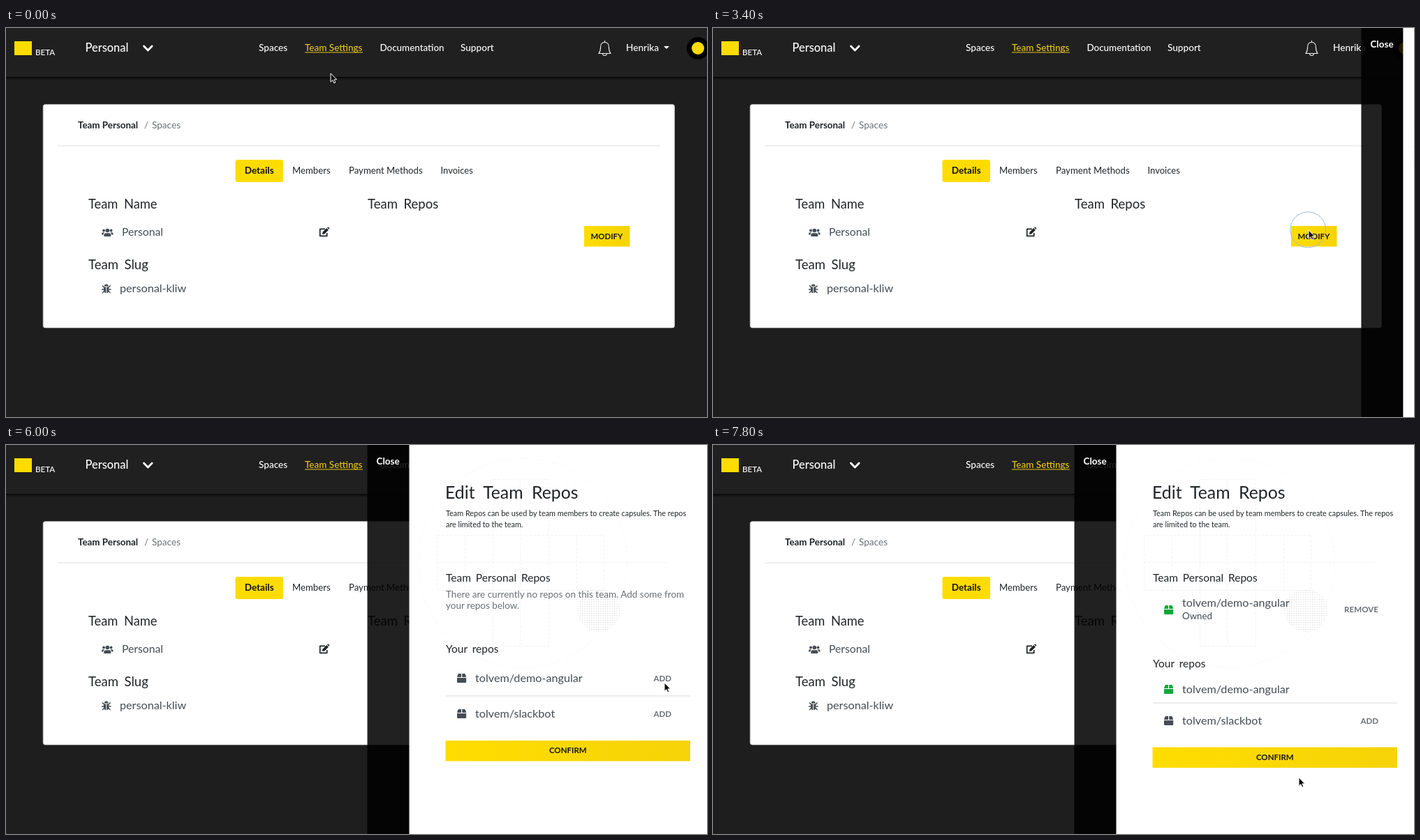
An HTML page for the animation above (8 s loop, 1004x558 px).

```html
<!DOCTYPE html>
<html lang="en">
<head>
<meta charset="utf-8">
<title>Team settings</title>
<style>
  html, body { margin: 0; width: 100%; height: 100%; overflow: hidden; background: #1e1e1e; }
  svg { display: block; width: 100vw; height: 100vh; }
  text { font-family: Lato, "Open Sans", sans-serif; white-space: pre; }
</style>
</head>
<body>
<svg id="stage" viewBox="0 0 1004 558"></svg>
<script>
const LOOP = 8000, STEP = 200;
const INK = '#212427', GREY = '#6b7075', SLATE = '#454c53', YELLOW = '#ffdc00', GREEN = '#16a637';

const text = (x, y, s, size, fill = INK, weight = 400, extra = '') =>
  `<text x="${x}" y="${y}" font-size="${size}" fill="${fill}" font-weight="${weight}" ${extra}>${s}</text>`;
const mid = 'text-anchor="middle"', end = 'text-anchor="end"';
const rect = (x, y, w, h, fill, extra = '') =>
  `<rect x="${x}" y="${y}" width="${w}" height="${h}" fill="${fill}" ${extra}/>`;
const line = (d, stroke, w = 1, extra = '') =>
  `<path d="${d}" fill="none" stroke="${stroke}" stroke-width="${w}" ${extra}/>`;
const group = (id, body, extra = '') => `<g id="${id}" ${extra}>${body}</g>`;
const heading = (x, y, s, size, gap) => text(x, y, s, size, INK, 400, `word-spacing="${gap}"`);

const nav = () =>
  rect(0, 0, 1004, 71, '#202020') + rect(0, 70, 1004, 2.5, '#0c0c0c') +
  rect(0, 72.5, 1004, 2, '#181818') +
  rect(12, 19, 25, 20, YELLOW) +
  text(42, 39, 'BETA', 11.6, '#fff', 500) +
  text(113.5, 34, 'Personal', 16.4, '#fff', 500) +
  line('M197.5 26l5.8 6 5.8-6', '#fff', 2.8, 'stroke-linecap="round" stroke-linejoin="round"') +
  text(362, 33, 'Spaces', 13.6, '#fff', 500) +
  text(428, 33, 'Team Settings', 13.5, '#e8c81c', 500) +
  rect(428, 34.5, 83, 1, '#e8c81c') +
  text(535.5, 33, 'Documentation', 13.4, '#fff', 500) +
  text(651, 33, 'Support', 13.6, '#fff', 500) +
  line('M849 36.5c2-2.5 2.6-4.5 2.6-9 0-4.500 2-7 5.900-7s5.900 2.500 5.900 7c0 4.500.6 6.500 2.600 9zM857.500 18v2.500M854.500 37c.4 3.300 5.600 3.300 6 0', '#f2f2f2', 1.1) +
  text(888, 33, 'Henrika', 13.6, '#fff', 500) +
  '<path d="M942 26h8l-4 4z" fill="#fff"/>' +
  `<circle cx="991" cy="29" r="12.5" fill="${YELLOW}" stroke="#000" stroke-width="7"/>`;

const users = 
  [[140, 290.5, 1.9], [150.500, 290.500, 1.9], [145.300, 290.500, 2.800]]
    .map(([x, y, r]) => `<circle cx="${x}" cy="${y}" r="${r}"/>`).join('') +
  '<path d="M140.300 299v-2q0-2.700 2.700-2.700h4.600q2.700 0 2.700 2.700v2zM137 296.500v-1.500q0-1.800 1.800-1.800h2.200q-1.600 1.200-1.700 3.300zM153.500 296.500v-1.500q0-1.800-1.800-1.800h-2.200q1.600 1.200 1.700 3.300z"/>';

const bug =
  '<path d="M140.700 370.500a3 3 0 0 1 6 0zM140 371.500h3.200v8.800q-3.200-.6-3.200-4zM144.200 371.500h3.200v4.800q0 3.400-3.200 4z"/>' +
  line('M138 369.500l2.500 2.500M149.500 369.500l-2.500 2.500M137 375h3M150.500 375h-3M138 380l2.500-2.500M149.500 380l-2.500-2.500', SLATE, 1.5);

const edit =
  line('M457 288.300h-7.300v10h10v-4.300', INK, 1.7, 'stroke-linejoin="round"') +
  `<path d="M453 296l.5-3.200 5.700-5.700 2.700 2.700-5.700 5.700zM460 286.300l.8-.7q.6-.4 1.200.1l1 1q.5.600 0 1.200l-.7.800z" fill="${INK}"/>`;

const card = () =>
  rect(53.2, 109.7, 904.3, 320.3, '#fff', 'rx="3" stroke="#cfcfcf" stroke-width=".7"') +
  text(103, 143.500, 'Team Personal', 13.4, INK, 700) +
  text(198, 143.500, '/', 13.4, GREY) + text(209, 143.500, 'Spaces', 13.6, GREY) +
  rect(74, 168.500, 863, 1, '#dedede') +
  rect(328.500, 189, 68.500, 32, YELLOW, 'rx="3"') +
  text(362.700, 209, 'Details', 13.5, '#111', 700, mid) +
  text(410, 209, 'Members', 13.2) +
  text(491, 209, 'Payment Methods', 13.2) +
  text(622.500, 209, 'Invoices', 13) +
  heading(118, 258.500, 'Team Name', 18.3, 4) +
  heading(518, 258.500, 'Team Repos', 18.5, 4) +
  heading(118, 345.500, 'Team Slug', 18.5, 4) +
  `<g fill="${SLATE}">${users}${bug}</g>` + edit +
  text(166, 298, 'Personal', 15.7, SLATE) +
  text(163, 379, 'personal-kliw', 16.2, SLATE) +
  rect(828, 284, 65.500, 29.500, 'url(#gold)') +
  text(860.500, 302.500, 'MODIFY', 11.4, '#161616', 700, mid);

const backdrop = () =>
  `<g opacity=".75">` +
  line('M617.500 129.500h239v79h-239zM697.500 49.500h80v239h-80zM736.500 49v239M617 168.500h328M657.500 129v79M817.500 129v79', '#f0f0f0', 1, 'stroke-dasharray="4 2"') +
  '<circle cx="740" cy="169" r="150" fill="none" stroke="#f3f3f3" stroke-dasharray="3 3"/>' +
  '<circle cx="849" cy="237" r="31" fill="url(#dots)"/></g>';

const crate = (y, fill) =>
  `<path transform="translate(646 ${y - 6.5})" fill="${fill}" d="M2.500 0h3.500v5h-6l1.300-4q.4-1 1.200-1zM7.200 0h3.500q.8 0 1.200 1l1.300 4h-6zM0 6h13.200v5.800q0 1.200-1.200 1.200h-10.800q-1.200 0-1.200-1.200z"/>`;
const repo = (y, name, action, fill = SLATE) =>
  crate(y + .5, fill) + text(672, y + 5.500, 'tolvem/' + name, 16.2, SLATE) +
  (action ? text(953, y + 4.500, action, 11.5, GREY, 700, end) : '');
const confirm = y =>
  rect(629.500, y, 350.500, 29.500, 'url(#gold)') +
  text(804.800, y + 18.300, 'CONFIRM', 11.5, '#161616', 700, mid);
const teamHead = heading(630, 195.500, 'Team Personal Repos', 15.5, 3);
const noTeamRepos = teamHead +
  text(630, 218.500, 'There are currently no repos on this team. Add some from', 13.5, GREY) +
  text(630, 234.500, 'your repos below.', 13.5, GREY);
const yours = y => heading(630, y, 'Your repos', 15.5, 3);

const panel = () =>
  rect(517.500, 0, 60.500, 558, '#000', 'opacity=".87"') +
  text(530.500, 27.500, 'Close', 13.5, '#fff', 700) +
  rect(577.500, 0, 440, 558, '#fff') + backdrop() +
  heading(629, 76.500, 'Edit Team Repos', 24.8, 6) +
  text(630, 102, 'Team Repos can be used by team members to create capsules. The repos', 10.85) +
  text(630, 117.500, 'are limited to the team.', 10.85) +
  group('loading',
    `<circle id="ring" cx="682" cy="182" r="29" fill="none" stroke="${YELLOW}" stroke-width="7.500" pathLength="360"/>` +
    heading(629.500, 238, 'Loading Repos', 15.9, 3)) +
  group('bare', noTeamRepos + yours(298) +
    text(630, 321, 'There are currently no repos set up.', 13.5, GREY) + confirm(344.700)) +
  group('list', noTeamRepos + yours(298) +
    repo(334, 'demo-angular', 'ADD') + rect(630, 359.500, 350, 1, '#dcdcdc') +
    repo(385, 'slackbot', 'ADD') + confirm(424)) +
  group('added', teamHead + crate(236.500, GREEN) +
    text(672, 231.500, 'tolvem/demo-angular', 16.2, SLATE) +
    text(672, 249.500, 'Owned', 13.3, SLATE) +
    text(953, 240, 'REMOVE', 11.6, GREY, 700, end) +
    yours(319) + repo(350, 'demo-angular', '', GREEN) +
    rect(630, 369.500, 350, 1, '#dcdcdc') +
    repo(395, 'slackbot', 'ADD') + confirm(433.500));

const stage = document.getElementById('stage');
stage.innerHTML =
  `<defs>
    <linearGradient id="gold"><stop stop-color="#ffdd00"/><stop offset="1" stop-color="#f5d308"/></linearGradient>
    <pattern id="dots" width="3.300" height="3.300" patternUnits="userSpaceOnUse"><rect width="1.200" height="1.200" fill="#ccc"/></pattern>
  </defs>` +
  rect(0, 0, 1004, 558, '#1e1e1e') + nav() + card() + group('panel', panel()) +
  '<circle id="click" r="25.500" fill="none" stroke="#9fb9d6" stroke-width="1"/>' +
  '<path id="cursor" d="M0 0V12.300L2.800 9.700 4.800 14 6.800 13.100 4.900 8.900H8.700Z" fill="#0b0b0b" stroke="#fff" stroke-width="1"/>';

const el = id => document.getElementById(id);
const [panelEl, loading, ring, bare, list, added, click, cursor] =
  ['panel', 'loading', 'ring', 'bare', 'list', 'added', 'click', 'cursor'].map(el);
const show = (node, on) => node.setAttribute('display', on ? 'inline' : 'none');
const move = (node, x, y) => node.setAttribute('transform', `translate(${x} ${y})`);
const ease = p => { p = Math.min(1, Math.max(0, p)); return p * p * (3 - 2 * p); };

// time, x, y
const path = [[400, 465, 65], [2400, 730.500, 232.500], [3200, 853, 290], [5000, 853, 290],
  [6000, 943, 341], [6800, 943, 341], [7800, 839, 477]];
function pointer(t) {
  let [, x, y] = path[0];
  for (let i = 1; i < path.length; i++) {
    const [t0, x0, y0] = path[i - 1], [t1, x1, y1] = path[i];
    const k = ease((t - t0) / (t1 - t0));
    x += (x1 - x0) * k;
    y += (y1 - y0) * k;
  }
  return [x, y];
}

function draw(t) {
  const [x, y] = pointer(t);
  move(cursor, x, y);
  move(click, x - .8, y - .7);
  show(click, t === 3400 || t === 6400);

  move(panelEl, 487 * (1 - ease((t - 3340) / 240)), 0);
  const first = t < 4200, adding = t >= 6400 && t < 7400, busy = first || adding;
  show(loading, busy);
  show(bare, first);
  show(list, !first && t < 7400);
  show(added, t >= 7400);
  move(bare, 0, 107.300);
  move(list, 0, adding ? 107.300 : 0);

  const age = t - 3600;
  const arc = 281 + 31 * Math.cos(age * 3 * Math.PI / 2800);
  ring.setAttribute('stroke-dasharray', `${arc} ${360 - arc}`);
  ring.setAttribute('transform', `rotate(${age * 696 / 2800 - 103} 682 182)`);
}

const start = performance.now();
function tick() {
  const t = (performance.now() - start) % LOOP;
  draw(Math.floor(t / STEP) * STEP);
  requestAnimationFrame(tick);
}
tick();
</script>
</body>
</html>
```
